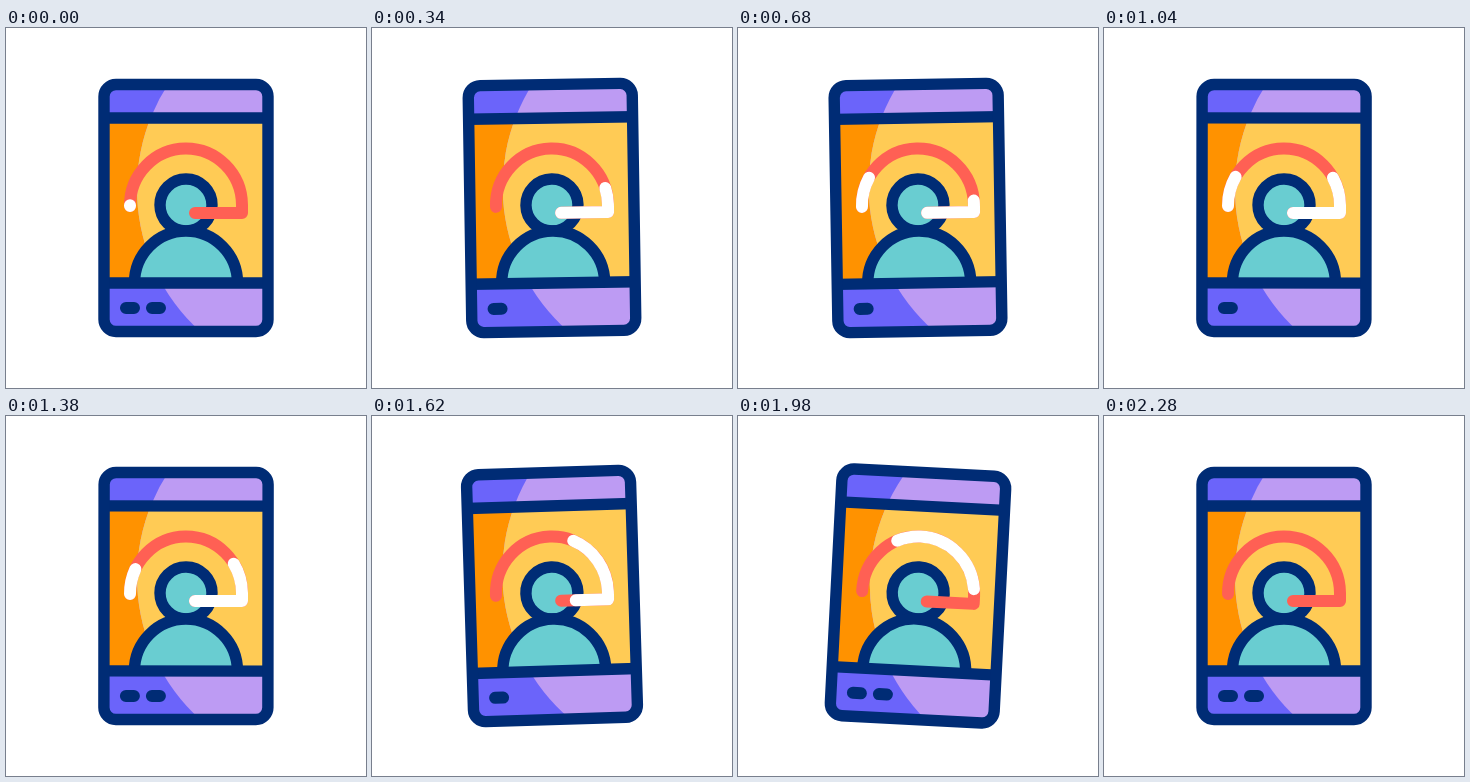
An HTML page for the animation above (2.4 s loop, 360 by 360 pixels).

```html
<!DOCTYPE html>
<html>
<head>
<meta charset="utf-8">
<style>
  html, body { margin: 0; width: 100%; height: 100%; overflow: hidden; background: #fff; }
  svg { display: block; width: 100vw; height: 100vh; }
  .line { stroke: #002c75; stroke-width: 11.4; }
  .headset { fill: none; stroke-width: 12; stroke-linecap: round; stroke-linejoin: round; }
  .pill { stroke: #002c75; stroke-width: 12; stroke-linecap: round; }
</style>
</head>
<body>
<svg viewBox="0 0 360 360">
  <defs>
    <clipPath id="body"><rect x="98" y="56.5" width="164" height="247" rx="12"/></clipPath>
    <clipPath id="lit"><circle cx="323" cy="161" r="192"/></clipPath>
    <path id="headset" d="M124 178A56 57 0 0 1 236 177V185H189"/>
  </defs>
  <g id="phone">
    <g clip-path="url(#body)">
      <path fill="#6b64fa" d="M98 56H262V304H98Z"/>
      <path fill="#ff9200" d="M98 90H262V255H98Z"/>
      <g clip-path="url(#lit)">
        <path fill="#bd9bf3" d="M98 56H262V304H98Z"/>
        <path fill="#ffcb55" d="M98 90H262V255H98Z"/>
      </g>
    </g>
    <circle class="line" fill="#69cdd1" cx="180" cy="177" r="26"/>
    <path class="line" fill="#69cdd1" d="M128.5 255A51.5 52 0 0 1 231.5 255"/>
    <path class="line" d="M98 90H262M98 255H262"/>
    <rect class="line" fill="none" x="98" y="56.5" width="164" height="247" rx="12"/>
    <path class="pill" d="M120 280H128"/>
    <path class="pill" d="M146 280H154"/>
    <use href="#headset" class="headset" stroke="#ff6054"/>
    <use href="#headset" class="headset glow" stroke="#fff"/>
    <use href="#headset" class="headset glow" stroke="#fff"/>
  </g>
</svg>
<script>
const LOOP = 2400, REST = 2280, SPEED = 0.8;
const phone = document.getElementById('phone');
const pills = document.querySelectorAll('.pill');
const glows = document.querySelectorAll('.glow');
const length = document.getElementById('headset').getTotalLength();

// Shake: turning points [ms, degrees], eased between
const shake = [[0, 0], [102, 3], [272, -3], [443, 3], [613, -3], [784, 3], [955, -3], [1125, 3],
  [1295, -3], [1465, 3], [1585, -3], [1705, 3], [1828, -3], [1990, 3], [2190, 0]];
// Light sweeps along the headset: [head start, tail start] in ms
const sweeps = [[0, 140], [345, 464], [643, 855], [1003, 1198], [1349, 1480], [1768, 1900]];

function angleAt(t) {
  const i = shake.findIndex(([time]) => time > t);
  if (i < 0) return 0;
  const [t0, a0] = shake[i - 1], [t1, a1] = shake[i];
  return a0 + (a1 - a0) * (1 - Math.cos(Math.PI * (t - t0) / (t1 - t0))) / 2;
}

function pillCount(t) {
  const phase = t % 300;
  if (t < 20 || t >= REST || (phase >= 180 && phase < 280)) return 2;
  return phase >= 30 && phase < 180 ? 1 : 0;
}

function draw(t) {
  phone.setAttribute('transform', `rotate(${angleAt(t)} 180 180)`);
  const count = pillCount(t);
  pills.forEach((pill, i) => pill.style.display = i < count ? '' : 'none');
  glows.forEach(glow => glow.style.display = 'none');
  sweeps.forEach(([start, end], i) => {
    const head = Math.min(length, SPEED * (t - start));
    const tail = Math.max(0, SPEED * (t - end));
    if (head <= 0 || tail >= length) return;
    const { style } = glows[i % 2];
    style.display = '';
    style.strokeDasharray = `${head - tail} 999`;
    style.strokeDashoffset = -tail;
  });
}

function tick() {
  draw(performance.now() % LOOP);
  requestAnimationFrame(tick);
}
tick();
</script>
</body>
</html>
```
